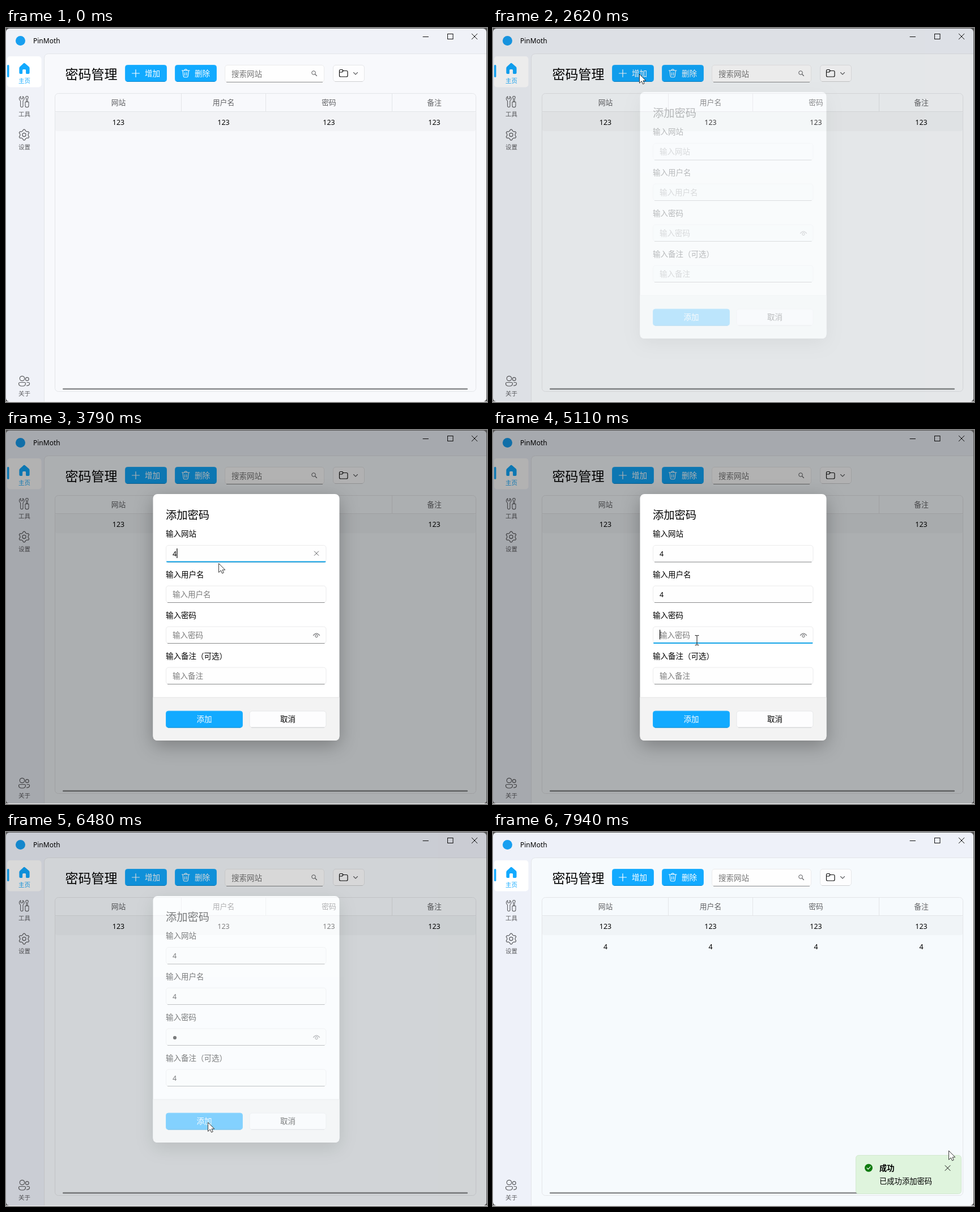
Write an HTML page that moves like this. It is 849x660 px and loops after 8 s.

```html
<!DOCTYPE html>
<html lang="zh-CN">
<head>
<meta charset="utf-8">
<title>密码管理</title>
<style>
html, body { margin: 0; width: 849px; height: 660px; overflow: hidden; background: #555; }
svg { display: block; font-family: "Noto Sans", "Noto Sans CJK SC", "Noto Sans CJK", sans-serif; }
.line { fill: none; stroke-linecap: round; stroke-linejoin: round; }
#card { filter: drop-shadow(0 9px 16px rgba(0,0,0,.28)); }
</style>
</head>
<body>
<svg id="stage" width="849" height="660" viewBox="0 0 849 660"></svg>
<script>
const BLUE = '#12aaff', GREY = '#5c5d60';
const LOOP = 8000;
const COLUMNS = [198.5, 384, 570, 756];

const text = (x, y, size, str, fill = '#000', anchor = 'start', more = '') =>
  `<text x="${x}" y="${y}" font-size="${size}" fill="${fill}" text-anchor="${anchor}" ${more}>${str}</text>`;
const mid = (x, y, size, str, fill, more) => text(x, y, size, str, fill, 'middle', more);
const rect = (x, y, w, h, r, fill, more = '') =>
  `<rect x="${x}" y="${y}" width="${w}" height="${h}" rx="${r}" fill="${fill}" ${more}/>`;
const line = (d, color = GREY, width = 1.1, more = '') =>
  `<path class="line" d="${d}" stroke="${color}" stroke-width="${width}" ${more}/>`;
const cross = (x, y, r, color = '#111', more = '') =>
  line(`M${x - r} ${y - r}l${2 * r} ${2 * r}m0 ${-2 * r}l${-2 * r} ${2 * r}`, color, 1, more);
const row = (y, size, labels, fill) => COLUMNS.map((x, i) => mid(x, y, size, labels[i], fill)).join('');

function inputBox(x, y, w, h) {
  return rect(x + .5, y + .5, w - 1, h - 1, 4.5, '#fefefe', 'stroke="#ebebec"') +
    line(`M${x + 3.5} ${y + h - .5}h${w - 7}`, '#8a8b8c', 1);
}

function plainButton(x, y, w, h) {
  return rect(x + .5, y + .5, w - 1, h - 1, 4.5, '#fdfdfe', 'stroke="#e6e7e9"') +
    line(`M${x + 4} ${y + h - .5}h${w - 8}`, '#cfd0d2', 1);
}

function blueButton(x, y, w, h, id) {
  return rect(x + .5, y + .5, w - 1, h - 1, 4, BLUE, `id="${id}" stroke="#2bb3ff"`) +
    line(`M${x + 4} ${y + h - .5}h${w - 8}`, '#0b87cc', 1);
}

function gear(cx, cy) {
  const pts = [];
  for (let i = 0; i < 24; i++) {
    const a = (i - 1.5) * Math.PI / 12 - Math.PI / 2, r = i % 4 === 1 || i % 4 === 2 ? 9.4 : 7.2;
    pts.push((cx + r * Math.cos(a)).toFixed(2) + ' ' + (cy + r * Math.sin(a)).toFixed(2));
  }
  return line(`M${pts.join('L')}Z`, GREY, 1.2) +
    `<circle cx="${cx}" cy="${cy}" r="3.1" fill="none" stroke="${GREY}" stroke-width="1.2"/>`;
}

// Ticks at which each field gains focus, receives its character and loses focus
const fields = [
  { top: 203, label: '输入网站', hint: '输入网站', focus: 50, typed: 57, blur: 62 },
  { top: 274.5, label: '输入用户名', hint: '输入用户名', focus: 62, typed: 66, blur: 72 },
  { top: 346.5, label: '输入密码', hint: '输入密码', focus: 72, typed: 80, blur: 85, secret: true },
  { top: 418.5, label: '输入备注（可选）', hint: '输入备注', focus: 85, typed: 88, blur: 95 },
];

const fieldMarkup = (f, i) => {
  const y = f.top, base = y + 20.3;
  return text(282, y - 15, 13.5, f.label) + inputBox(282, y, 283.5, 30.5) +
    text(294, base, 13.5, f.hint, '#7d7d7d', 'start', `id="hint${i}"`) +
    (f.secret ? `<circle id="value${i}" cx="298" cy="${y + 16.5}" r="3.1"/>` +
      line(`M542.5 ${y + 16}q5.5 -7 11 0`, GREY, 1.1) +
      `<circle cx="548" cy="${y + 17}" r="2.2" fill="none" stroke="${GREY}"/>`
      : text(294, base, 12.5, '4', '#000', 'start', `id="value${i}"`)) +
    line(`M284 ${y + 29.5}h279.5`, '#12a4e8', 2, `id="under${i}"`) +
    (f.secret ? '' : cross(548, y + 14.7, 3.7, GREY, `id="clear${i}"`)) +
    rect(301.3, y + 6, 1.2, 17, 0, '#000', `id="caret${i}"`);
};

const nav =
  rect(2, 50, 60.5, 54.5, 5, '#fff') + rect(2, 65, 3.5, 22, 1.7, BLUE) +
  `<path d="M31 62.2q1.200-1 2.400 0l7 6q1.200 1 1.200 2.500V79q0 2-2 2h-3q-1.500 0-1.500-1.500v-5q0-1.500-1.500-1.500h-3q-1.500 0-1.500 1.500v5q0 1.500-1.500 1.500h-2.200q-2 0-2-2v-8.300q0-1.500 1.200-2.500z" fill="${BLUE}"/>` +
  mid(32.5, 96.5, 10.5, '主页', BLUE) +
  line('M26 120.700a4.300 4.300 0 0 0-.4 7.700V137.500a2.200 2.200 0 0 0 4.400 0V128.400a4.300 4.300 0 0 0-.4-7.700V125h-3.600z') +
  line('M35.500 120.500h3l.8 2.500-1.300 2v5h-2v-5l-1.300-2zM34 130.500h6v6.500a3 3 0 0 1-6 0z') +
  mid(32.5, 155.5, 10.5, '工具', GREY) + gear(32, 188.5) + mid(32.5, 214, 10.5, '设置', GREY) +
  `<g fill="none" stroke="${GREY}" stroke-width="1.2"><circle cx="28.500" cy="618.500" r="4.200"/><circle cx="37.300" cy="619.500" r="2.900"/></g>` +
  line('M25 625.500h7.500q2 0 2 2q0 4.500-6 4.500t-6-4.500q0-2 2.500-2M37 625.500h2.500q2 0 2 2q0 3.800-5 3.600', GREY, 1.2) +
  mid(32.5, 649, 10.5, '关于', GREY);

const toolbar =
  text(104.5, 90.3, 23, '密码管理') +
  blueButton(210, 65, 74, 30, 'addTop') + line('M222.500 80h13M229 73.500v13', '#fff', 1.2) +
  text(245, 84.9, 13.5, '增加', '#fff') +
  blueButton(298, 65, 74, 30, 'remove') +
  line('M310.500 75h13.500M315 75a2.200 2.200 0 0 1 4.500 0M312 75l1.200 10q.2 1.800 2 1.800h4q1.800 0 2-1.800l1.200-10M315.700 78.500v5M318.800 78.500v5', '#fff', 1.1) +
  text(333, 84.9, 13.5, '删除', '#fff') +
  inputBox(386, 65, 176, 31) + text(398, 85.7, 13.5, '搜索网站', '#777') +
  `<circle cx="543" cy="79" r="3.300" fill="none" stroke="${GREY}"/>` + line('M545.500 81.500l3 3') +
  plainButton(577, 65, 56, 30) +
  line('M588.500 75.500q0-2 2-2h2.800l2 2h5.700q2 0 2 2v6.500q0 2-2 2h-10.500q-2 0-2-2zM588.500 78h4.500l2.300-2.500', '#111', 1.2) +
  line('M613.500 78.500l3.500 3.500l3.500-3.500', GREY);

const table =
  rect(86.5, 115.5, 743, 526, 6, 'none', 'stroke="#e3e5e8"') +
  line('M87 147.500h742M309.500 116v31M458.500 116v31M681.500 116v31', '#e3e5e8', 1) +
  rect(87, 148, 742, 34, 3, 'rgba(0,0,0,.024)') +
  row(136.3, 12.8, ['网站', '用户名', '密码', '备注'], '#606164') +
  row(171, 12.4, Array(4).fill('123')) +
  `<g id="newRow">${row(206.7, 12.4, Array(4).fill('4'))}</g>` +
  rect(100, 635.7, 715, 2.6, 1.3, '#87898b');

const dialog =
  rect(0, 0, 849, 660, 0, 'rgba(0,0,0,.302)') +
  rect(259.5, 113, 329, 435, 8, '#fff', 'id="card"') +
  `<path d="M259.500 472h329v68q0 8-8 8h-313q-8 0-8-8z" fill="#f3f3f3"/>` +
  line('M260 472h328', '#e4e4e4', 1) +
  text(282, 156.8, 19.3, '添加密码') + fields.map(fieldMarkup).join('') +
  blueButton(282, 495.5, 136, 30, 'addMain') + mid(350, 515.3, 13.5, '添加', '#fff') +
  plainButton(429.5, 495.5, 136, 30) + mid(497.5, 515.3, 13.5, '取消');

const toast =
  rect(.5, 570.5, 186, 68, 5, '#dff4dd', 'stroke="#d3e8d1"') +
  '<circle id="tick" cx="23" cy="592.700" r="7"/>' + line('M20 592.800l2.200 2.200l4-4.300', '#fff', 1.2) +
  text(42, 598.3, 13.3, '成功', '#000', 'start', 'font-weight="700"') +
  text(42, 620.8, 13.3, '已成功添加密码') + cross(162.5, 593, 4.5);

const stage = document.getElementById('stage');
stage.innerHTML =
  '<defs><clipPath id="frame"><rect y="1" width="848" height="658" rx="6"/></clipPath></defs>' +
  rect(0, 659, 849, 1, 0, '#f4f4f4') +
  '<g clip-path="url(#frame)">' +
  rect(0, 0, 849, 660, 0, '#fff', 'id="base"') +
  '<path id="pane" d="M67.500 660V53.500q0-8 8-8H849V660z" stroke="#e3e5e9"/>' +
  `<circle cx="25.500" cy="22.500" r="8.500" fill="#189ff0"/>` + text(48, 27, 12, 'PinMoth') +
  line('M736 15.500h9.500', '#111', 1) + rect(779.5, 10.5, 9.5, 9, 0, 'none', 'stroke="#111"') + cross(827, 15, 4.8) +
  nav + toolbar + table +
  `<g id="dialog">${dialog}</g><g id="toast">${toast}</g></g>` +
  '<circle id="press" r="11.700" fill="#ff0" fill-opacity=".47"/>' +
  '<path id="arrow" d="M.5 .5V16.300L4.300 12.800l2.300 5.200l2.600-1.200l-2.200-4.900h4.800z" fill="#fff" stroke="#222" stroke-width=".9"/>' +
  line('M-3 -8.500h2.200l.8 .8l.8-.8h2.200M0 -7.700v15.400M-3 8.500h2.200l.8-.8l.8 .8h2.200', '#111', 1, 'id="beam"');

const $ = {};
stage.querySelectorAll('[id]').forEach(el => $[el.id] = el);
const show = (el, on) => { if (el) el.style.display = on ? '' : 'none'; };
const clamp = v => Math.max(0, Math.min(1, v));

// tick, x, y
const path = [
  [22, 514, 293], [28, 330, 135], [30, 330, 135], [35, 258, 81], [44, 258, 81],
  [48, 378, 217], [56, 378, 217], [57, 375, 235], [61, 366, 290], [66, 366, 290],
  [68, 362, 306], [71, 360, 371], [81, 360, 371], [84, 358, 434], [89, 358, 434],
  [91, 356, 482], [95, 356, 512], [97, 356, 512], [98, 358, 510], [103, 498, 370],
  [112, 498, 370], [114, 585, 404], [115, 655, 450], [116, 700, 490], [119, 804, 562],
];
const presses = [37, 50, 62, 72, 85, 95, 108];

function pointer(k) {
  const i = path.findIndex(p => p[0] >= k);
  if (i < 0) return path[path.length - 1].slice(1);
  if (i === 0) return path[0].slice(1);
  const [a, ax, ay] = path[i - 1], [b, bx, by] = path[i], u = (k - a) / (b - a);
  return [ax + (bx - ax) * u, ay + (by - ay) * u];
}

const tones = {
  start: [[240, 242, 248], [248, 249, 252]],
  idle: [[243, 243, 243], [250, 250, 250]],
  active: [[238, 241, 249], [246, 250, 253]],
};
function backdrop(k) {
  const [from, to, u] = k < 37
    ? [tones.start, tones.idle, clamp(k / 7)]
    : [tones.idle, tones.active, clamp((k - 36) / 4)];
  [$.base, $.pane].forEach((el, j) =>
    el.setAttribute('fill', `rgb(${from[j].map((v, c) => Math.round(v + (to[j][c] - v) * u))})`));
}

function draw(ms) {
  const k = Math.floor(ms * .015 + .36); // the picture steps 15 times a second
  backdrop(k);

  const fade = k < 97 ? clamp((k - 38) / 4) : k === 97 ? .5 : 0;
  $.dialog.style.opacity = fade;
  show($.dialog, fade > 0);
  fields.forEach((f, i) => {
    const focused = k >= f.focus && k < f.blur, filled = k >= f.typed;
    const since = k - (filled ? f.typed : f.focus);
    show($['hint' + i], !filled);
    show($['value' + i], filled);
    show($['under' + i], focused);
    show($['clear' + i], focused && filled);
    show($['caret' + i], focused && Math.floor(since / 8) % 2 === 0);
    $['caret' + i].setAttribute('x', filled ? 301.3 : 294);
  });

  const done = k >= 98, slide = 1 - clamp((k - 96.3) / 3);
  show($.newRow, done);
  show($.toast, done);
  $.toast.setAttribute('transform', `translate(${(640 + 209 * slide * slide).toFixed(1)} 0)`);
  $.tick.setAttribute('fill', k < 99 ? '#2b3d1c' : '#0f7b0f');

  const [x, y] = pointer(k), at = `translate(${Math.round(x)} ${Math.round(y)})`;
  const beam = fade === 1 && x > 282 && x < 565 && fields.some(f => y > f.top && y < f.top + 30.5);
  show($.arrow, k >= 22 && !beam);
  show($.beam, beam);
  show($.press, presses.includes(k));
  for (const el of [$.arrow, $.beam, $.press]) el.setAttribute('transform', at);
  $.addTop.setAttribute('fill', k >= 35 && k < 38 ? '#2ab3ff' : BLUE);
}

const begin = performance.now();
function loop() {
  draw((performance.now() - begin) % LOOP);
  requestAnimationFrame(loop);
}
loop();
</script>
</body>
</html>
```
